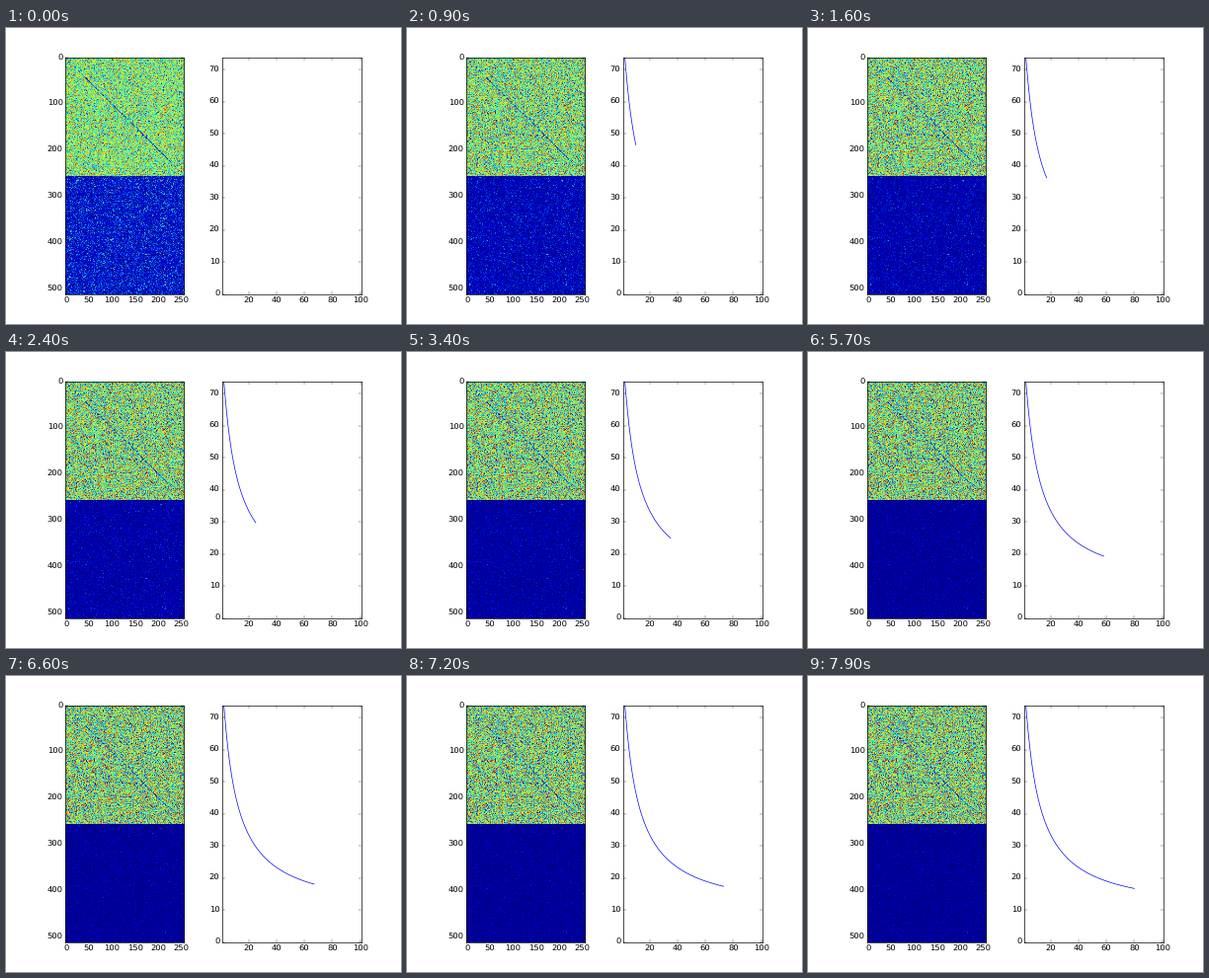
Animation of 400x300 px, one loop 8000 ms. Source, as a matplotlib script:

```python
import numpy as np
import matplotlib.pyplot as plt
from matplotlib.animation import FuncAnimation

plt.style.use("classic")
plt.rcParams.update({
    "font.family": "DejaVu Sans",
    "text.hinting": "no_hinting",
    "text.kerning_factor": 0,
})

FRAMES, INTERVAL = 80, 100
N = 256

# Smooth loss curve: a quartic in log-log space through a few anchors
anchor_x = np.array([1, 2, 5, 10, 15, 20, 25, 35, 45, 58, 67, 80])
anchor_y = np.array([78.5, 73.9, 60.8, 46.7, 38.7, 33.3, 29.6, 25, 22.1, 19.5, 18.2, 16.7])
fit = np.polyfit(np.log(anchor_x), np.log(anchor_y), 4)
steps = np.arange(1, FRAMES + 1)
loss = np.exp(np.polyval(fit, np.log(steps)))
level = loss / loss[0]

rng = np.random.default_rng(7)
weights_a, weights_b = rng.normal(size=(2, N, N))
error_a, error_b = rng.normal(size=(2, N, N))

# Dark diagonal that fades towards both ends
rows, cols = np.indices((N, N))
offset = np.abs(rows - cols)
ramp = np.clip(np.minimum(rows - 15, 250 - rows) / 30, 0, 1)
diagonal = ((offset == 0) + 0.5 * (offset == 1)) * ramp
diagonal = diagonal * rng.uniform(0.3, 0.65, (N, 1))


def matrix(i):
    """Weights above, error sizes below, both drifting as the loss falls."""
    done = 1 - level[i]
    c, s = np.cos(1.2 * done), np.sin(1.2 * done)
    spread = 0.18 + 0.06 * done
    top = 0.51 + spread * (c * weights_a + s * weights_b)
    top = top - diagonal * (1 - 0.3 * done)
    bottom = 0.13 * level[i] * np.abs(c * error_a + s * error_b) ** 1.5
    return np.vstack([top, bottom])


fig, (ax_map, ax_loss) = plt.subplots(1, 2, figsize=(8, 6), dpi=50, facecolor="white")

# Blending colours rather than values keeps the muted look of the dense noise
image = ax_map.imshow(matrix(0), cmap="jet", vmin=0, vmax=1,
                      interpolation="bilinear", interpolation_stage="rgba")
ax_map.set_xticks(range(0, 251, 50))
ax_map.set_yticks(range(0, 501, 100))

line, = ax_loss.plot([], [], "b-")
ax_loss.set_xlim(1, 101)
ax_loss.set_ylim(0, 73.8)
ax_loss.set_xticks(range(20, 101, 20))
ax_loss.set_yticks(range(0, 71, 10))


def update(i):
    image.set_data(matrix(i))
    line.set_data(steps[:i + 1], loss[:i + 1])
    return image, line


anim = FuncAnimation(fig, update, frames=FRAMES, interval=INTERVAL,
                     repeat=True, repeat_delay=0, blit=False)
plt.show()
```
